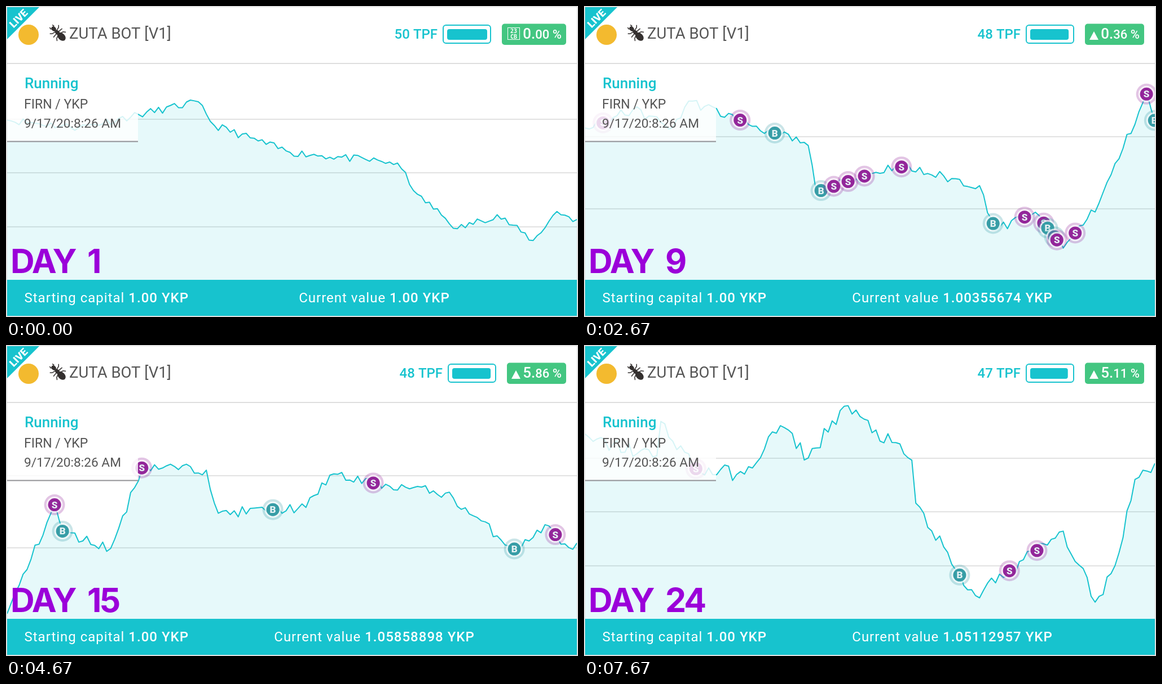
Write an HTML page with a canvas that moves like this. It is 1014 by 552 pixels and loops after 8 s.

```html
<!DOCTYPE html>
<html lang="en">
<head>
<meta charset="utf-8">
<title>Bot chart</title>
<style>
html, body { margin: 0; width: 100%; height: 100%; overflow: hidden; background: #fff; }
canvas { display: block; }
</style>
</head>
<body>
<canvas id="stage" width="1014" height="552"></canvas>
<script>
const ctx = document.getElementById('stage').getContext('2d');
const TEAL = '#17c3ce', GREY = '#555', LINE = '#e2e2e2', PURPLE = '#9b00d9';
const LOOP = 8000, DAYS = 24, SPAN = 143;
const LEFT = 2, RIGHT = 1012, FLOOR = 487, HEIGHT = 382;
const COIN = 'YKP';

// Main turns of the price: [hour, hundredths of a grid unit]
const turns = [
  [0, 498], [18, 484], [48, 532], [52, 488], [71, 438], [98, 418], [103, 360], [113, 296], [123, 322],
  [132, 274], [138, 328], [153, 278], [160, 305], [173, 284], [185, 211], [196, 238], [206, 213],
  [210, 250], [240, 188], [242, 123], [262, 160], [283, 132], [287, 70], [297, 95], [304, 45],
  [313, 108], [325, 261], [327, 221], [339, 199], [347, 314], [363, 308], [366, 248], [388, 256],
  [394, 301], [405, 290], [423, 276], [441, 195], [448, 232], [454, 200], [484, 250], [489, 207],
  [500, 212], [508, 150], [519, 168], [538, 152], [539, 184], [548, 139], [560, 135], [569, 180],
  [576, 150], [585, 198], [602, 148], [603, 108], [613, 46], [618, 22], [640, 82], [648, 16],
  [653, 50], [658, 130], [663, 145]
];
const buys = [179.3, 231.6, 243.2, 286.4, 300.1, 301.8, 326.9, 379.7, 440.3, 506.8, 614];
const sells = [188.5, 222.9, 246.4, 250, 254.1, 263.4, 294.3, 299.1, 302.4, 307, 324.9, 346.8,
  404.9, 450.6, 489, 547.8, 626.5, 633.4];
// By day: balance, and the first hour on show
const balance = [
  [1, 1], [2, 1], [5, 0.99603724], [7, 0.95137482], [8, 0.89764153], [9, 1.00355674], [10, 1.11284936],
  [11, 1.06469427], [12, 1.10763218], [15, 1.05858898], [18, 1.05098962], [20, 1.03527416], [24, 1.05112957]
];
const starts = [[1, 0], [5, 88], [9, 184], [11, 232], [15, 313], [18, 376], [24, 520]];

function lerpKnots(knots, x) {
  const i = Math.max(1, knots.findIndex(k => k[0] >= x));
  const [x0, y0] = knots[i - 1], [x1, y1] = knots[i];
  return y0 + (y1 - y0) * (x - x0) / (x1 - x0);
}

let seed = 11;
const random = () => (seed = seed * 16807 % 2147483647) / 2147483647;

const prices = Array.from({ length: 664 }, (_, h) => {
  const noise = (random() - 0.5) * 14;
  return lerpKnots(turns, h) + (turns.some(k => k[0] === h) ? 0 : noise);
});
const trades = [...buys.map(h => [h, 'B']), ...sells.map(h => [h, 'S'])].sort((a, b) => a[0] - b[0]);

const font = (weight, size, family = 'Roboto') => `${weight} ${size}px ${family}, sans-serif`;

function text(str, x, y, style, color, align = 'left', spacing = 0) {
  ctx.font = style;
  ctx.fillStyle = color;
  ctx.textAlign = align;
  ctx.letterSpacing = spacing + 'px';
  ctx.fillText(str, x, y);
}

function width(str, style, spacing = 0) {
  ctx.font = style;
  ctx.letterSpacing = spacing + 'px';
  return ctx.measureText(str).width;
}

function rect(x, y, w, h, color) {
  ctx.fillStyle = color;
  ctx.fillRect(x, y, w, h);
}

function roundRect(x, y, w, h, r) {
  ctx.beginPath();
  ctx.roundRect(x, y, w, h, r);
}

function polygon(points, color) {
  ctx.beginPath();
  points.forEach(p => ctx.lineTo(...p));
  ctx.fillStyle = color;
  ctx.fill();
}

function oval(x, y, rx, ry, color) {
  ctx.beginPath();
  ctx.ellipse(x, y, rx, ry, 0, 0, 7);
  ctx.fillStyle = color;
  ctx.fill();
}

function marker(x, y, letter) {
  const rgb = letter === 'B' ? '55,157,166' : '147,38,154';
  oval(x, y, 18.5, 18.5, `rgba(${rgb},.27)`);
  oval(x, y, 14.5, 14.5, 'rgba(255,255,255,.75)');
  oval(x, y, 11.5, 11.5, `rgb(${rgb})`);
  text(letter, x, y + 6, font(900, 17), '#e6f2f4', 'center');
}

function chart(day) {
  const start = Math.round(lerpKnots(starts, day));
  const shown = prices.slice(start, start + SPAN + 1);
  const min = Math.min(...shown), max = Math.max(...shown);
  const step = max - min < 200 ? 50 : 100;
  const low = Math.floor(min / step) * step;
  const high = Math.ceil(max / step) * step;
  const px = h => LEFT + (h - start) * (RIGHT - LEFT) / SPAN;
  const py = v => FLOOR - (v - low) / (high - low) * HEIGHT;

  ctx.save();
  ctx.beginPath();
  ctx.rect(LEFT, 104, RIGHT - LEFT, 383);
  ctx.clip();
  for (let v = low + step; v < high; v += step) rect(LEFT, Math.round(py(v)) - 1, 1010, 2, LINE);

  ctx.beginPath();
  shown.forEach((v, i) => ctx.lineTo(px(start + i), py(v)));
  ctx.strokeStyle = TEAL;
  ctx.lineWidth = 2;
  ctx.lineJoin = 'round';
  ctx.stroke();
  ctx.lineTo(RIGHT, FLOOR);
  ctx.lineTo(LEFT, FLOOR);
  ctx.fillStyle = 'rgba(23,195,206,.105)';
  ctx.fill();

  for (const [h, letter] of trades) marker(px(h), py(lerpKnots(turns, h)), letter);
  ctx.restore();
}

function panel() {
  rect(2, 104, 232, 136, 'rgba(255,255,255,.82)');
  rect(2, 239.5, 232, 2, '#929296');
  text('Running', 33, 146, font(500, 26), TEAL);
  text('FIRN / ' + COIN, 32, 182, font(400, 23), GREY);
  text('9/17/20:8:26 AM', 32, 216, font(400, 22.7), GREY);
}

function ant() {
  const color = '#34302f';
  ctx.save();
  ctx.translate(91, 47);
  ctx.rotate(Math.PI / 4);
  ctx.strokeStyle = color;
  ctx.lineWidth = 1.5;
  ctx.beginPath();
  for (const side of [-1, 1]) {
    for (const x of [-3, 0.5, 4]) {
      ctx.moveTo(x, 0);
      ctx.lineTo(x * 1.6, side * 8);
      ctx.lineTo(x * 2.6, side * 11);
    }
    ctx.moveTo(-10, 0);
    ctx.lineTo(-13, side * 4);
    ctx.lineTo(-16, side * 3);
  }
  ctx.stroke();
  oval(-9, 0, 4.8, 3.8, color);
  oval(0, 0, 5, 3.5, color);
  oval(10.5, 0, 8.5, 6, color);
  ctx.restore();
}

function badge(value) {
  const gain = (value - 1) * 100;
  const [whole, cents] = gain.toFixed(2).split('.');
  const big = font(500, 26), small = font(500, 22);
  const centsX = 985 - width(cents + ' %', small);
  const wholeX = centsX - width(whole + '.', big);
  const left = Math.round(wholeX - (gain ? 28.4 : 37));
  roundRect(left, 31.5, 993 - left, 37.5, 5);
  ctx.fillStyle = gain < 0 ? '#e9a21c' : '#43c681';
  ctx.fill();
  text(whole + '.', wholeX, 58, big, '#fff');
  text(cents + ' %', centsX, 58, small, '#fff');
  if (gain) {
    const [foot, tip] = gain > 0 ? [60, 45] : [45, 60];
    polygon([[left + 8, foot], [left + 24, foot], [left + 16, tip]], '#fff');
  } else {
    ctx.strokeStyle = '#fff';
    ctx.lineWidth = 1;
    ctx.strokeRect(left + 10.5, 38.5, 21, 21);
    const mono = '700 10px "DejaVu Sans Mono", monospace';
    text('23', left + 21, 48, mono, '#fff', 'center');
    text('CB', left + 21, 58, mono, '#fff', 'center');
  }
  return left;
}

function header(day, value) {
  rect(2, 101, 1010, 2, '#dedede');
  oval(40, 51, 18, 18, '#f3ba2f');
  polygon([[2, 2], [59, 2], [2, 59]], TEAL);
  ctx.save();
  ctx.translate(22, 22);
  ctx.rotate(-Math.PI / 4);
  text('LIVE', 0, 6.5, font(900, 18), '#fff', 'center');
  ctx.restore();
  ant();
  text('ZUTA BOT [V1]', 112, 58, font(400, 27.5), GREY);

  const left = badge(value);
  const credits = day < 4 ? 50 : day < 9 ? 49 : day < 19 ? 48 : 47;
  text(credits + ' TPF', left - 114, 58, font(500, 24), TEAL, 'right');
  roundRect(left - 104, 34, 84, 32, 5);
  ctx.strokeStyle = TEAL;
  ctx.lineWidth = 2;
  ctx.stroke();
  roundRect(left - 97, 41, credits * 1.42, 19, 4);
  ctx.fillStyle = TEAL;
  ctx.fill();
}

function footer(value) {
  const light = font(400, 24), bold = font(500, 24);
  const pair = (label, amount, x) => {
    text(label, x, 526, light, '#fff', 'left', 1);
    text(amount, x + width(label, light, 1), 526, bold, '#fff', 'left', 1);
  };
  rect(2, 486, 1010, 64, TEAL);
  pair('Starting capital ', '1.00 ' + COIN, 32.5);
  const label = 'Current value ';
  const amount = value.toFixed(value === 1 ? 2 : 8) + ' ' + COIN;
  pair(label, amount, 653 - (width(label, light, 1) + width(amount, bold, 1)) / 2);
}

function draw(day) {
  const value = lerpKnots(balance, day);
  rect(0, 0, 1014, 552, '#fff');
  chart(day);
  panel();
  header(day, value);
  footer(value);
  const heavy = font(700, 59, 'Inter');
  text('DAY', 8, 474, heavy, PURPLE, 'left', -2.5);
  text(day, 144, 474, heavy, PURPLE, 'left', -3);
  ctx.strokeStyle = '#dedede';
  ctx.lineWidth = 2;
  ctx.strokeRect(1, 1, 1012, 550);
}

const began = performance.now();
function tick() {
  const t = (performance.now() - began) % LOOP;
  draw(Math.min(DAYS, 1 + Math.floor((t + 3.4) * DAYS / LOOP)));
  requestAnimationFrame(tick);
}
tick();
</script>
</body>
</html>
```
